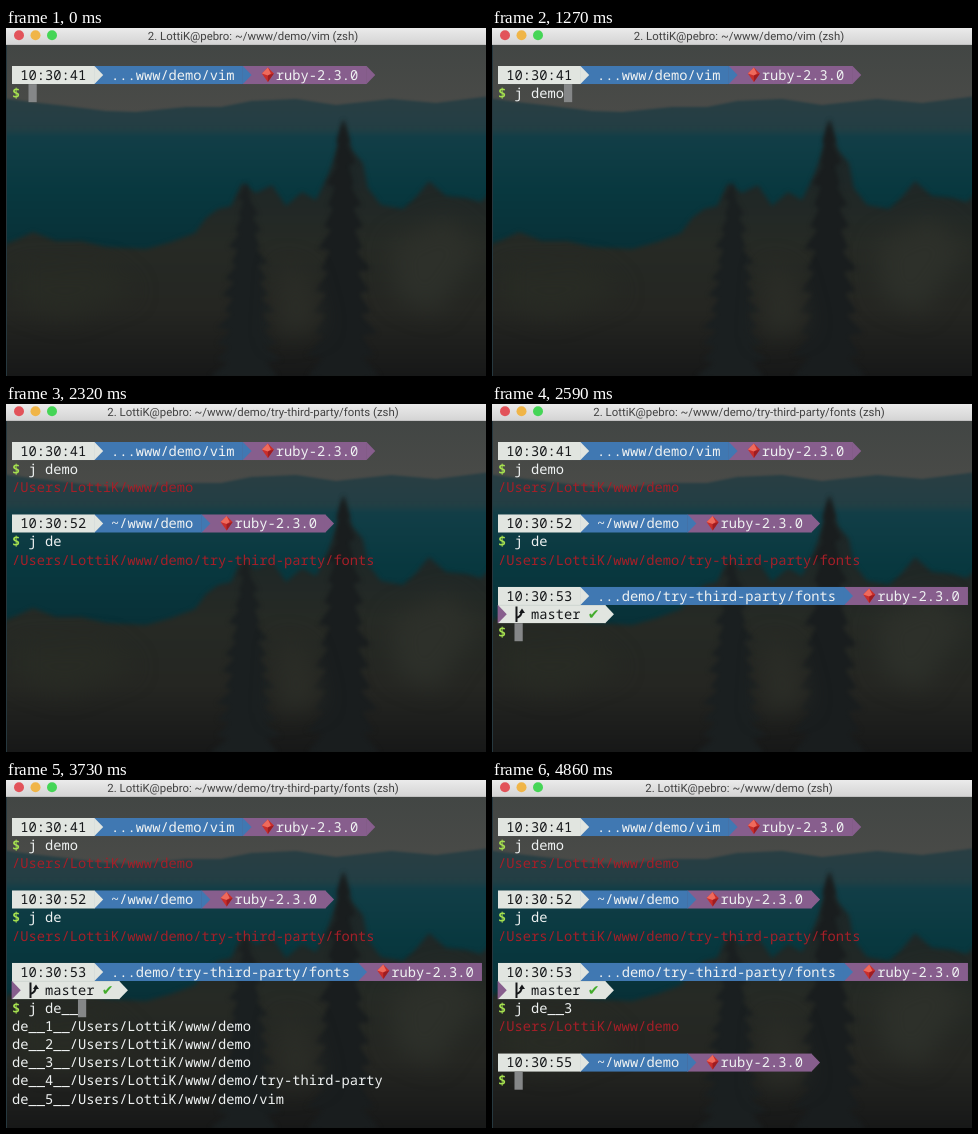
An HTML page with a canvas for the animation above (4900 ms loop, 480x348 px).

```html
<!DOCTYPE html>
<html lang="en">
<head>
<meta charset="utf-8">
<title>Terminal directory jumping</title>
<style>
  html, body { margin: 0; width: 100%; height: 100%; overflow: hidden; background: #252826; }
  canvas { display: block; width: 480px; height: 348px; }
</style>
</head>
<body>
<canvas id="stage" width="480" height="348"></canvas>
<script>
const W = 480, H = 348, LOOP = 4900;
const CELL = 8.245, ROW = 18.12, LEFT = 6, TOP = 38;
const MONO = '13.74px "Noto Sans Mono", monospace';
const COLOR = {
  text: '#eff2f2', dark: '#151719', light: '#e1e5e0', blue: '#4078b2',
  purple: '#875e8d', red: '#a51f28', green: '#a5e04f', cursor: '#858788'
};
const HOME = '/Users/LottiK/www/demo';
const FONTS_DIR = '/try-third-party/fonts';

const ctx = document.getElementById('stage').getContext('2d');
ctx.textRendering = 'geometricPrecision';

const colX = col => LEFT + col * CELL;
const rowY = row => TOP + row * ROW;

function polygon(c, points, fill) {
  c.beginPath();
  points.forEach(([x, y]) => c.lineTo(x, y));
  c.closePath();
  c.fillStyle = fill;
  c.fill();
}

function verticalGradient(c, y0, y1, ...colors) {
  const g = c.createLinearGradient(0, y0, 0, y1);
  colors.forEach((color, i) => g.addColorStop(i / (colors.length - 1), color));
  return g;
}

function conifer(c, x, top, halfWidth, fill) {
  const tiers = 12, left = [], right = [];
  for (let i = 1; i <= tiers; i++) {
    const y = top + (H - top) * i / tiers;
    const spread = halfWidth * Math.pow(i / tiers, 0.7);
    const sway = Math.sin(i * 2.3 + x) * 3;
    right.push([x + spread + sway, y], [x + spread * 0.6, y + 3]);
    left.unshift([x - spread * 0.6, y + 3], [x - spread + sway, y]);
  }
  polygon(c, [[x, top], ...right, ...left], fill);
}

function paintLandscape() {
  const layer = document.createElement('canvas');
  layer.width = W;
  layer.height = H;
  const c = layer.getContext('2d');
  c.fillStyle = verticalGradient(c, 17, 85, '#424644', '#4a4b48');
  c.fillRect(0, 0, W, H);

  c.filter = 'blur(1px)';
  polygon(c, [[-5, 70], [25, 74], [60, 78], [100, 83], [130, 84], [180, 79], [215, 79],
    [245, 73], [290, 71], [330, 77], [385, 71], [430, 75], [485, 68], [485, 112], [-5, 112]],
    verticalGradient(c, 70, 110, '#293e43', '#223f45'));
  c.filter = 'blur(3px)';
  c.fillStyle = verticalGradient(c, 102, 225, '#133f48', '#08383f', '#083037');
  c.fillRect(-15, 105, W + 30, H);

  c.filter = 'blur(2px)';
  polygon(c, [[-9, 219], [10, 212], [27, 204], [50, 213], [75, 213], [100, 219], [140, 221],
    [165, 214], [189, 205], [200, 190], [212, 181], [225, 178], [236, 155], [250, 165],
    [266, 157], [280, 178], [296, 164], [310, 172], [322, 147], [329, 128], [338, 91],
    [346, 122], [357, 135], [362, 160], [375, 177], [397, 181], [410, 169], [423, 153],
    [440, 168], [460, 170], [475, 174], [489, 160], [489, 357], [-9, 357]],
    verticalGradient(c, 150, H, '#1e2727', '#262a25', '#252622', '#171818'));
  conifer(c, 337, 92, 36, '#191d1e');
  conifer(c, 241, 154, 34, '#1a1f20');
  c.filter = 'blur(12px)';
  polygon(c, [[275, 235], [300, 245], [315, 300], [270, 310]], '#2b2d27');
  polygon(c, [[385, 215], [440, 190], [475, 220], [430, 285], [390, 270]], '#2d302a');
  polygon(c, [[10, 240], [100, 238], [130, 265], [60, 290], [10, 275]], '#282b24');
  c.filter = 'none';
  c.fillStyle = '#26383f';
  c.fillRect(0, 17, 1, H);
  return layer;
}
const landscape = paintLandscape();

function write(row, col, text, color, weight = '') {
  ctx.font = weight + MONO;
  ctx.textAlign = 'left';
  ctx.fillStyle = color;
  ctx.fillText(text, colX(col), rowY(row) + 13.8);
}

function block(row, col, columns, color) {
  ctx.fillStyle = color;
  ctx.fillRect(colX(col), rowY(row), columns * CELL, ROW - 0.1);
}

function arrow(row, col, color) {
  const x = colX(col), y = rowY(row);
  polygon(ctx, [[x - 0.4, y], [x, y], [x + CELL + 0.5, y + ROW / 2], [x, y + ROW], [x - 0.4, y + ROW]], color);
}

function gem(row, col) {
  const x = colX(col) + 8.5, y = rowY(row) + 8.5;
  polygon(ctx, [[x, y - 7], [x + 6, y - 1], [x, y + 7.5], [x - 6, y - 1]], '#c92e2b');
  polygon(ctx, [[x, y - 7], [x + 3, y - 1], [x, y + 1], [x - 6, y - 1]], '#ee6a5c');
  polygon(ctx, [[x + 6, y - 1], [x, y + 7.5], [x, y + 1]], '#9d1d22');
}

function prompt(row, clock, path, wraps = false) {
  const pathEnd = 13 + path.length;
  const rubyColumns = 15;
  block(row, 0, 10, COLOR.light);
  block(row, 10, pathEnd - 10, COLOR.blue);
  block(row, pathEnd, rubyColumns, COLOR.purple);
  arrow(row, 10, COLOR.light);
  arrow(row, pathEnd, COLOR.blue);
  if (!wraps) arrow(row, pathEnd + rubyColumns, COLOR.purple);
  write(row, 1, clock, COLOR.dark);
  write(row, 12, path, COLOR.text);
  gem(row, pathEnd + 2);
  write(row, pathEnd + 4, 'ruby-2.3.0', COLOR.text);
}

function branchStatus(row) {
  block(row, 0, 13, COLOR.light);
  arrow(row, 0, COLOR.purple);
  arrow(row, 13, COLOR.light);
  const x = colX(2) + 2, y = rowY(row);
  ctx.strokeStyle = COLOR.dark;
  ctx.lineWidth = 2;
  ctx.beginPath();
  ctx.moveTo(x, y + 1.5);
  ctx.lineTo(x, y + 17);
  ctx.moveTo(x, y + 13);
  ctx.quadraticCurveTo(x + 5.5, y + 11, x + 5.5, y + 5);
  ctx.stroke();
  polygon(ctx, [[x + 2.5, y + 8], [x + 5.5, y + 3.5], [x + 8.5, y + 8]], COLOR.dark);
  write(row, 4, 'master', COLOR.dark);
  ctx.font = '14px "DejaVu Sans", sans-serif';
  ctx.fillStyle = '#43ac2c';
  ctx.fillText('✔', colX(11) - 1, y + 14);
}

// Each key time reveals one more character; the cursor stays until Enter.
function command(row, text, keys, enter, t) {
  const typed = keys.filter(k => t >= k).length;
  write(row, 0, '$', COLOR.green, 'bold ');
  write(row, 2, text.slice(0, typed), COLOR.text);
  if (t < enter) block(row, 2 + typed, 1, COLOR.cursor);
}

function titleBar(path) {
  ctx.fillStyle = verticalGradient(ctx, 0, 17, '#ebebeb', '#d3d3d3');
  ctx.fillRect(0, 0, W, 17);
  ctx.fillStyle = '#aeaeae';
  ctx.fillRect(0, 16.5, W, 0.5);
  ['#e2535a', '#f0b548', '#45d556'].forEach((color, i) => {
    ctx.beginPath();
    ctx.arc(13 + i * 16.5, 7.3, 5, 0, Math.PI * 2);
    ctx.fillStyle = color;
    ctx.fill();
  });
  ctx.font = '11.4px Roboto, sans-serif';
  ctx.textAlign = 'center';
  ctx.fillStyle = '#414141';
  ctx.fillText(`2. LottiK@pebro: ~/www/demo${path} (zsh)`, 247, 11.5);
}

const ENTER = [1300, 2300, 4220];
const READY = [1390, 2400, 4320];
const TAB = 3420;

function draw(t) {
  ctx.drawImage(landscape, 0, 0);
  titleBar(t < ENTER[0] ? '/vim' : t < ENTER[1] || t >= ENTER[2] ? '' : FONTS_DIR);

  prompt(0, '10:30:41', '...www/demo/vim');
  command(1, 'j demo', [400, 510, 640, 770, 900, 1030], ENTER[0], t);
  if (t >= ENTER[0]) write(2, 0, HOME, COLOR.red);

  if (t >= READY[0]) {
    prompt(4, '10:30:52', '~/www/demo');
    command(5, 'j de', [1640, 1750, 1900, 2020], ENTER[1], t);
  }
  if (t >= ENTER[1]) write(6, 0, HOME + FONTS_DIR, COLOR.red);

  if (t >= READY[1]) {
    prompt(8, '10:30:53', '...demo' + FONTS_DIR, true);
    branchStatus(9);
    command(10, 'j de__3', [2830, 2940, 3080, 3200, TAB, TAB, 3960], ENTER[2], t);
  }
  if (t >= TAB && t < ENTER[2]) {
    ['', '', '', '/try-third-party', '/vim'].forEach((dir, i) =>
      write(11 + i, 0, `de__${i + 1}__${HOME}${dir}`, COLOR.text));
  }
  if (t >= ENTER[2]) write(11, 0, HOME, COLOR.red);

  if (t >= READY[2]) {
    prompt(13, '10:30:55', '~/www/demo');
    command(14, '', [], Infinity, t);
  }
}

const start = performance.now();
function tick() {
  draw((performance.now() - start) % LOOP);
  requestAnimationFrame(tick);
}
tick();
</script>
</body>
</html>
```
